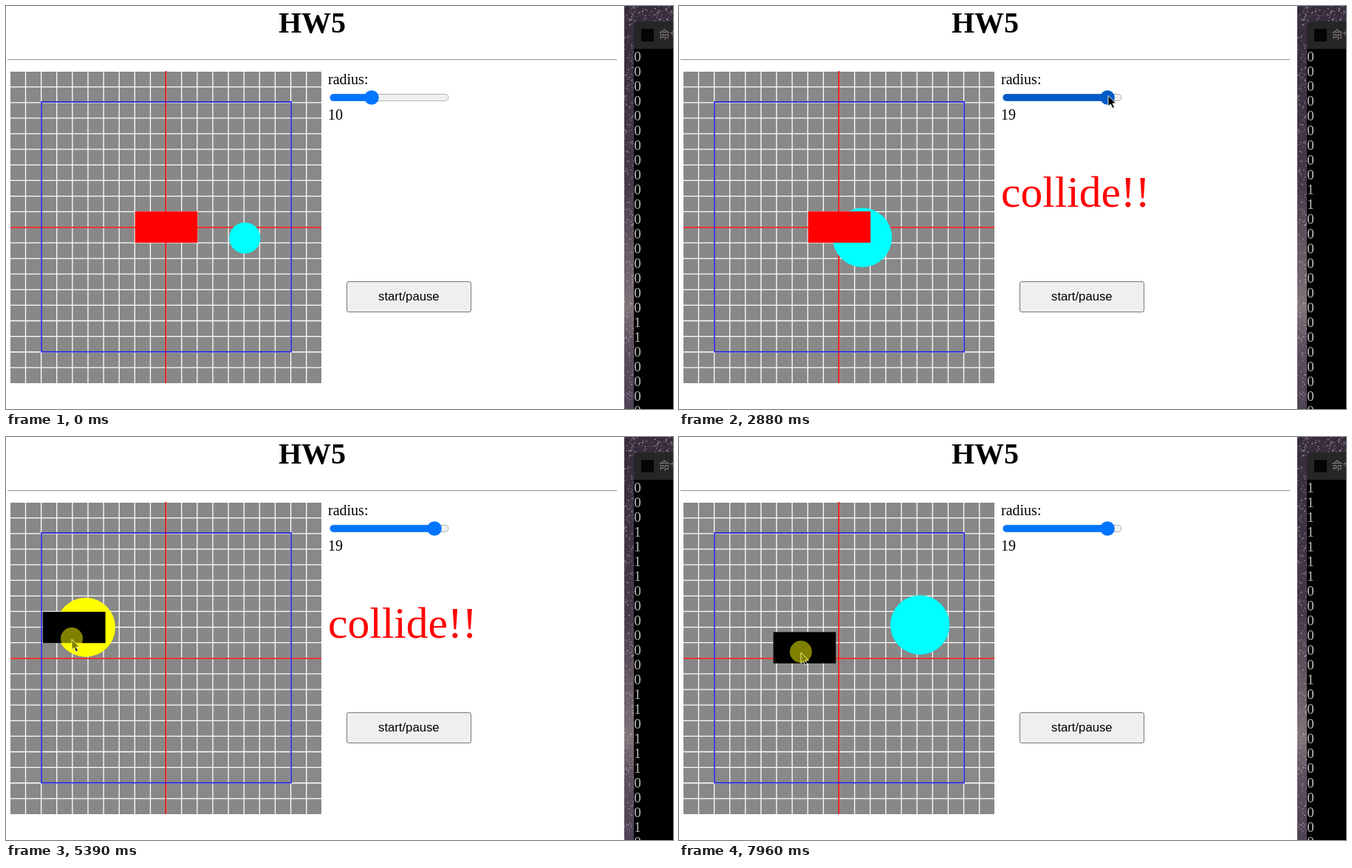
An HTML page for the animation above (8000 ms loop, 903 by 546 pixels).

```html
<!DOCTYPE html>
<html lang="en">
<head>
<meta charset="utf-8">
<title>HW5</title>
<style>
html, body { margin: 0; width: 100%; height: 100%; overflow: hidden; background: #fff; }
svg { display: block; }
.serif { font-family: "Liberation Serif", "Times New Roman", serif; }
.sans { font-family: "Liberation Sans", Arial, sans-serif; }
.cjk { font-family: "Noto Sans CJK TC", "Noto Sans CJK", sans-serif; }
</style>
</head>
<body>
<svg width="903" height="546" viewBox="0 0 903 546">
  <defs>
    <linearGradient id="sky" x1="0" y1="0" x2="0" y2="1">
      <stop offset="0" stop-color="#352b3b"/>
      <stop offset=".45" stop-color="#463a49"/>
      <stop offset=".75" stop-color="#80747a"/>
      <stop offset=".84" stop-color="#5c4f5d"/>
      <stop offset="1" stop-color="#4c4153"/>
    </linearGradient>
  </defs>
  <rect width="837" height="546" fill="#fff"/>
  <text class="serif" x="414.5" y="36" font-size="40" font-weight="700" text-anchor="middle">HW5</text>
  <path d="M2 72.5H827" stroke="#9a9a9a"/>
  <path d="M2 73.5H827" stroke="#eee"/>

  <rect x="6" y="89" width="421" height="422" fill="#888"/>
  <path id="grid" stroke="#fff" stroke-width="1.3"/>
  <path d="M6 300H427M216.4 88V511" stroke="#f00" stroke-width="1.6"/>
  <rect x="48" y="130" width="338" height="338.6" fill="none" stroke="#1c1ce6" stroke-width="1.6"/>
  <circle id="ball"/>
  <rect id="box"/>

  <g class="serif" font-size="20">
    <text x="436" y="106">radius:</text>
    <text id="value" x="436" y="154"></text>
  </g>
  <rect x="439" y="119.5" width="160" height="9" rx="4.5" fill="#efefef" stroke="#b2b2b2"/>
  <g id="slider">
    <rect id="fill" x="438.5" y="119.2" height="9.6" rx="4.8"/>
    <circle id="thumb" cy="124" r="9.8"/>
  </g>
  <text id="alert" class="serif" x="436" y="272" font-size="59.5" fill="#f00">collide!!</text>
  <rect id="button" x="461.5" y="373.5" width="168" height="41" rx="2.5"/>
  <text class="sans" x="545.3" y="399" font-size="16.67" text-anchor="middle">start/pause</text>

  <rect x="837" width="66" height="546" fill="url(#sky)"/>
  <g id="stars" fill="#d8cbd8"></g>
  <path d="M850 546V29q0-8 8-8H903V546Z" fill="#262626"/>
  <path d="M850 58H903V546H850Z" fill="#000"/>
  <rect x="860" y="31" width="17" height="17" fill="#050505"/>
  <text class="cjk" x="884" y="44" font-size="14.5" fill="#8d7f84">命令</text>
  <g id="console" class="serif" font-size="19" fill="#bbb"></g>

  <path id="cursor" d="M0 0V14.5L3.3 11.5L5.9 17L8.5 15.8L6 10.5H10.5Z" stroke="#fff" stroke-width=".9"/>
  <circle id="halo" r="15" fill="#ff0" fill-opacity=".5"/>
</svg>
<script>
const LOOP = 8000, UNIT = 2.112;
const TICK = 98.9, ROWS = 25, LIVE_ROW = 29;
const CX = 217.5, CY = 300, VX = 0.151, VY = 0.299;
const HALF_W = 42.3, HALF_H = 21.2;
const SLIDE = [2530, 2850], GRAB = [3900, 5650], CLICK = [7060, 7140], REGRAB = 7890;
const RESIZED = 2600, PAUSED = 7117, LAG = 80;

const $ = id => document.getElementById(id);
const set = (id, attrs) => { for (const k in attrs) $(id).setAttribute(k, attrs[k]); };
const show = (id, on) => set(id, { visibility: on ? 'visible' : 'hidden' });
const clamp = (v, lo, hi) => Math.min(hi, Math.max(lo, v));
const during = (t, [a, b]) => t >= a && t < b;

// Stops of the mouse: time, x, y. The hand eases from one to the next.
const stops = [
  [770, 674, 520], [1230, 515, 212], [1650, 495, 122],
  [SLIDE[0], 495, 122], [SLIDE[1], 582, 121],
  [GRAB[0], 207, 294], [4250, 202, 433], [4510, 202, 433], [4650, 178, 325],
  [5050, 110, 217], [5310, 82.3, 252.5], [5390, 89, 274], [GRAB[1], 160, 280],
  [6420, 261, 300], [6900, 540, 390], [7540, 540, 390], [7860, 165, 292]
];

function hand(t) {
  const i = clamp(stops.findIndex(s => s[0] > t), -1, stops.length);
  if (i <= 0) return stops.at(i).slice(1);
  const [t0, x0, y0] = stops[i - 1], [t1, x1, y1] = stops[i];
  const f = (t - t0) / (t1 - t0), e = f * f * (3 - 2 * f);
  return [x0 + (x1 - x0) * e, y0 + (y1 - y0) * e];
}

// Position folded back at the walls c - h and c + h.
function bounce(p, c, h) {
  const d = (((p - c + h) % (4 * h)) + 4 * h) % (4 * h);
  return c - h + (d < 2 * h ? d : 4 * h - d);
}

function radius(t) {
  if (t < SLIDE[0]) return 10;
  return Math.round(10 + (hand(Math.min(t, SLIDE[1]))[0] - 495) / 9.45);
}

function ball(t) {
  const small = t < RESIZED;
  const s = small ? t : Math.min(t, PAUSED) - 2880;
  const h = (80 - (small ? 10 : 19)) * UNIT + 1;
  return small
    ? [bounce(323.5 - VX * s, CX, h), bounce(314 + VY * s, CY, h)]
    : [bounce(248 + VX * s, CX, h), bounce(314 - VY * s, CY, h)];
}

// The box trails the hand that drags it.
function box(t) {
  const [x, y] = hand(clamp(t - LAG, ...GRAB));
  return [x + 10, y + 5.5];
}

function collides(tick) {
  const t = tick * TICK, [x, y] = ball(t), [bx, by] = box(t);
  const dx = Math.max(0, Math.abs(x - bx) - HALF_W);
  const dy = Math.max(0, Math.abs(y - by) - HALF_H);
  return Math.hypot(dx, dy) < radius(t) * UNIT;
}

function build() {
  let d = '';
  for (let i = -9; i <= 9; i++) {
    const s = i * 10 * UNIT;
    d += `M${216.6 + s} 89V511M6 ${299.8 + s}H427`;
  }
  set('grid', { d });
  set('box', { width: 2 * HALF_W, height: 2 * HALF_H });

  let seed = 7, stars = '';
  const rnd = () => (seed = seed * 16807 % 2147483647) / 2147483647;
  for (let i = 0; i < 600; i++) {
    const top = i % 4 === 0;
    const x = 837 + rnd() * (top ? 66 : 13), y = rnd() * (top ? 21 : 546);
    const r = 0.3 + rnd() * 0.6, o = 0.15 + rnd() * 0.6;
    stars += `<circle cx="${x}" cy="${y}" r="${r}" opacity="${o}"/>`;
  }
  $('stars').innerHTML = stars;

  let rows = '';
  for (let i = 0; i < ROWS; i++) rows += `<text x="850.3" y="${75 + i * 20}"></text>`;
  $('console').innerHTML = rows;
}

function draw(t) {
  const [x, y] = ball(t), [bx, by] = box(t), [mx, my] = hand(t);
  const r = radius(t), thumb = 495 + (r - 10) * 9.45;
  const dragging = during(t, GRAB) || t >= REGRAB;
  const pressed = dragging || during(t, SLIDE) || during(t, CLICK);

  set('ball', { cx: x, cy: y, r: r * UNIT, fill: x > 216.6 ? '#0ff' : '#ff0' });
  set('box', { x: bx - HALF_W, y: by - HALF_H, fill: dragging ? '#000' : '#f00' });

  const onSlider = during(t, SLIDE) || Math.hypot(mx - thumb, my - 124) < 10;
  set('slider', { fill: onSlider ? '#005cc8' : '#0075ff' });
  set('fill', { width: thumb - 438 });
  set('thumb', { cx: thumb });
  $('value').textContent = r;

  const onButton = Math.abs(mx - 545.5) < 84 && Math.abs(my - 394) < 21;
  set('button', { fill: onButton ? '#e5e5e5' : '#efefef', stroke: onButton ? '#4f4f4f' : '#767676' });

  const tick = Math.floor(t / TICK);
  [...$('console').children].forEach((row, i) => {
    row.textContent = collides(tick + i - LIVE_ROW) ? '1' : '0';
  });
  show('alert', collides(tick));

  show('cursor', t >= stops[0][0]);
  set('cursor', { transform: `translate(${mx} ${my})` });
  show('halo', pressed);
  set('halo', { cx: mx, cy: my - 1 });
}

build();
const start = performance.now();
function loop(now) {
  draw(Math.max(0, now - start) % LOOP);
  requestAnimationFrame(loop);
}
draw(0);
requestAnimationFrame(loop);
</script>
</body>
</html>
```
